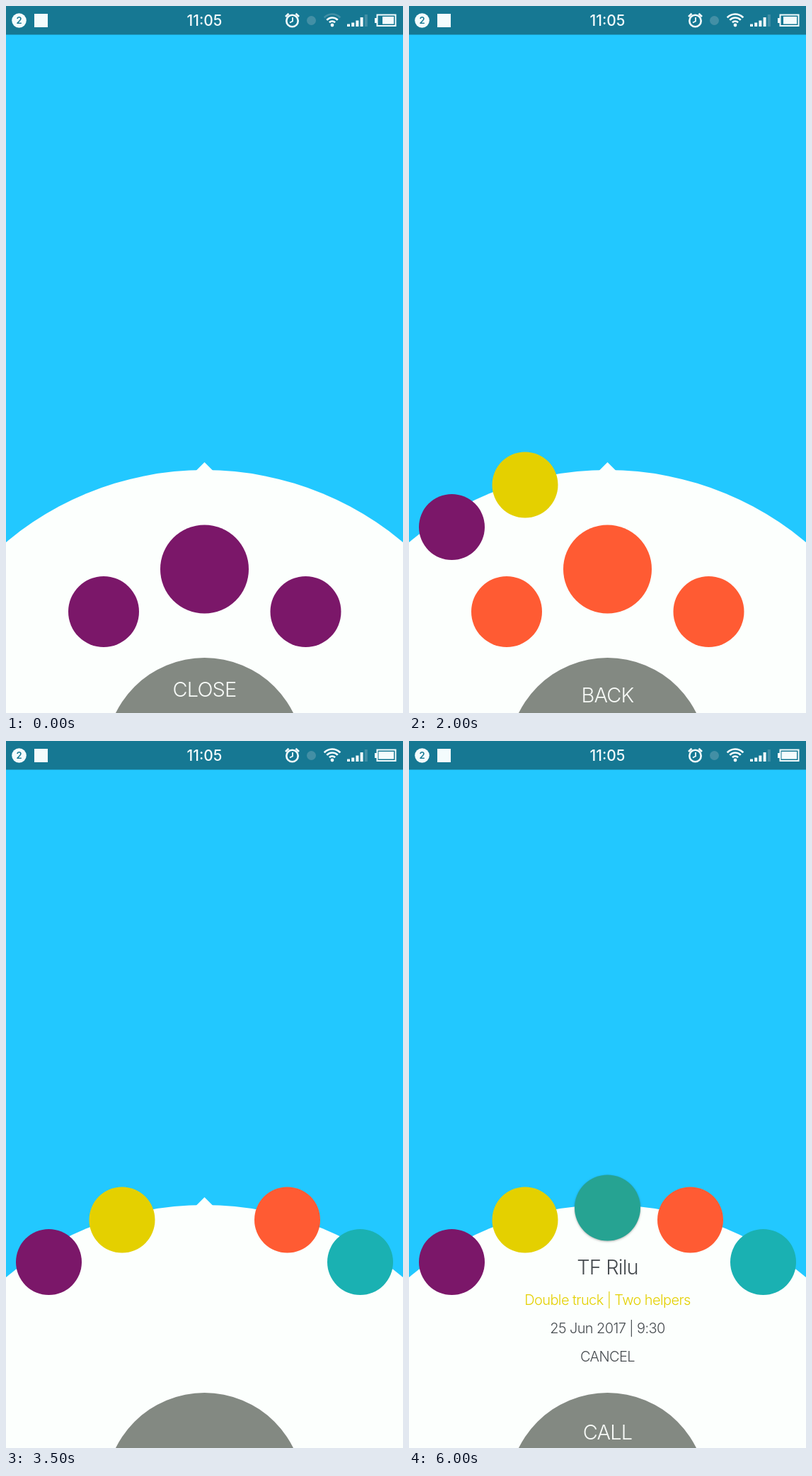
Write an HTML page with a canvas that moves like this. It is 561x998 px and loops after 6.1 s.

```html
<!DOCTYPE html>
<html lang="en">
<head>
<meta charset="utf-8">
<style>
  html, body { margin: 0; width: 100%; height: 100%; overflow: hidden; background: #22c8ff; }
  canvas { display: block; width: 561px; height: 998px; }
</style>
</head>
<body>
<canvas id="stage"></canvas>
<script>
const W = 561, H = 998, LOOP = 6100, STEP = 100, MID = 280.5;
const TAU = Math.PI * 2;
const SKY = '#22c8ff', PAPER = '#fcfffd', GRAY = '#838982', INK = '#474c50', YELLOW = '#e4d000';
const FLY = 470, ARC = 1.01;

const slots = [{ x: 138, y: 855, r: 50 }, { x: MID, y: 795, r: 62.5 }, { x: 423.5, y: 855, r: 50 }];
const picks = [
  { color: '#7b1769', slot: 0, at: 830, x: 60.5, y: 735.5 },
  { color: YELLOW, slot: 1, at: 1530, x: 164, y: 676 },
  { color: '#ff5b33', slot: 2, at: 2200, x: 397.5, y: 676 },
  { color: '#1ab1b2', slot: 0, at: 2855, x: 500.5, y: 735.5 }
];
const charge = [[0, 532], [1700, 529], [2600, 526.5], [4500, 532], [5300, 529], [5700, 526.5]];

const canvas = document.getElementById('stage');
const ctx = canvas.getContext('2d');
const dpr = window.devicePixelRatio || 1;
canvas.width = W * dpr;
canvas.height = H * dpr;

const span = (t, start, length) => Math.min(1, Math.max(0, (t - start) / length));
const mix = (a, b, k) => a + (b - a) * k;
const smooth = k => (1 - Math.cos(Math.PI * k)) / 2;
const easeOut = k => 1 - (1 - k) ** 3;

function disc(x, y, r, color) {
  ctx.fillStyle = color;
  ctx.beginPath();
  ctx.arc(x, y, Math.max(0, r), 0, TAU);
  ctx.fill();
}

function ring(x, y, r, width, color, from = 0, to = TAU) {
  ctx.strokeStyle = color;
  ctx.lineWidth = width;
  ctx.beginPath();
  ctx.arc(x, y, r, from, to);
  ctx.stroke();
}

function box(x, y, w, h, color) {
  ctx.fillStyle = color;
  ctx.fillRect(x, y, w, h);
}

function line(color, width, ...points) {
  ctx.strokeStyle = color;
  ctx.lineWidth = width;
  ctx.beginPath();
  points.forEach(([x, y]) => ctx.lineTo(x, y));
  ctx.stroke();
}

function text(str, x, y, size, color, weight = 300, spacing = -0.03) {
  ctx.font = `${weight} ${size}px Inter, "Liberation Sans", sans-serif`;
  ctx.letterSpacing = `${spacing * size}px`;
  ctx.textAlign = 'center';
  ctx.fillStyle = color;
  ctx.fillText(str, x, y);
}

function faded(alpha, draw) {
  if (alpha <= 0) return;
  ctx.save();
  ctx.globalAlpha = alpha;
  draw();
  ctx.restore();
}

// Point on a circular arc that bulges to the left of its direction of travel.
function arcPoint(a, b, k) {
  const dx = b.x - a.x, dy = b.y - a.y, angle = (2 * k - 1) * ARC;
  const along = 0.5 + Math.sin(angle) / (2 * Math.sin(ARC));
  const side = (Math.cos(angle) - Math.cos(ARC)) / (2 * Math.sin(ARC));
  return { x: a.x + dx * along + dy * side, y: a.y + dy * along - dx * side };
}

function statusBar(t) {
  const white = '#f4fcfd', dim = '#438fa5';
  box(0, 0, W, 40.5, '#167893');

  disc(18.5, 20.5, 10.3, white);
  text('2', 18.5, 25.2, 13, '#167893', 600, 0);
  box(40, 11, 19, 19, white);
  text('11:05', MID, 28, 21, white, 500, 0);

  ring(404.5, 21, 8.2, 2.6, white);
  line(white, 1.8, [405, 16], [405, 21.5], [401, 23.5]);
  line(white, 2.6, [395, 15], [399.5, 10.8]);
  line(white, 2.6, [414, 15], [409.5, 10.8]);

  disc(431.5, 20.5, 6.5, dim);

  [5.5, 10.5, 15.5].forEach((r, i) =>
    ring(461, 27, r, 2.7, i === 2 && t < 600 ? dim : white, -Math.PI * 0.76, -Math.PI * 0.24));
  disc(461, 27, 2.4, white);

  [3.5, 5.5, 8.5, 13, 17].forEach((h, i) =>
    box(482 + i * 6.2, 29 - h, 4, h, i === 4 ? dim : white));

  ctx.strokeStyle = white;
  ctx.lineWidth = 2;
  ctx.strokeRect(524.5, 12.5, 26, 15.5);
  box(521, 17, 3, 7, white);
  const left = charge.filter(([at]) => t >= at).pop()[1];
  box(left, 15, 548 - left, 10.5, white);
}

function panel() {
  disc(MID, 1091.7, 436.7, PAPER);
  ctx.beginPath();
  ctx.moveTo(MID, 644);
  ctx.lineTo(293, 656.5);
  ctx.lineTo(268, 656.5);
  ctx.fill();
}

function choices(t) {
  picks.forEach((pick, i) => {
    if (t >= pick.at) return;
    const k = i ? easeOut(span(t, picks[i - 1].at + 120, 330)) : 1;
    if (k > 0) {
      slots.forEach(s => disc(mix(MID, s.x, k), mix(1040, s.y, k), s.r * k, pick.color));
    }
  });
}

function picked(t) {
  for (const pick of picks) {
    if (t < pick.at) continue;
    const from = slots[pick.slot], k = smooth(span(t, pick.at, FLY));
    const p = arcPoint(from, pick, k);
    disc(p.x, p.y, mix(from.r, 46.5, k), pick.color);
  }
}

function touch(t) {
  for (const { slot, at } of picks) {
    if (t < at - 130 || t > at + 60) continue;
    const x = slots[slot].x + 3, y = slots[slot].y - 6;
    const glow = ctx.createRadialGradient(x, y, 14, x, y, 21);
    glow.addColorStop(0, 'rgba(200,225,225,.4)');
    glow.addColorStop(1, 'rgba(200,225,225,0)');
    disc(x, y, 21, glow);
    disc(x, y, 15.8, 'rgba(255,255,255,.42)');
  }
}

function button(t) {
  const k = smooth(span(t, 3500, 400)) - smooth(span(t, 4380, 500));
  disc(MID, mix(1060, 998, k), mix(140, 390, k), GRAY);

  const label = (str, y, alpha) => faded(alpha, () => text(str, MID, y, 29, '#f7faf7'));
  const swap = smooth(span(t, 830, 250));
  label('CLOSE', 975 - 20 * swap, 1 - swap * 2);
  label('BACK', 983 + 20 * (1 - swap), swap - span(t, 3350, 150));
  const call = easeOut(span(t, 5100, 400));
  label('CALL', 986 + 25 * (1 - call), call);

  if (t >= 3900 && t < 4400) {
    const turn = (t - 4100) / 1333 * TAU;
    const start = -0.73 + turn;
    ring(281, 803.5, 28, 6, SKY, start, start + 2.65 + 0.8 * Math.sin(turn));
  }
}

function details(t) {
  const pop = easeOut(span(t, 4850, 350));
  if (pop > 0) {
    ctx.save();
    ctx.shadowColor = 'rgba(0,0,0,.3)';
    ctx.shadowBlur = 3 * dpr;
    ctx.shadowOffsetY = dpr;
    disc(MID, 659, 46.5 * pop, '#26a392');
    ctx.restore();
  }
  const rows = [
    ['TF Rilu', 753, 29, INK],
    ['Double truck | Two helpers', 796, 20, YELLOW],
    ['25 Jun 2017 | 9:30', 836, 20, INK],
    ['CANCEL', 876, 20, INK]
  ];
  rows.forEach(([str, y, size, color], i) => {
    const k = easeOut(span(t, 5000 + i * 60, 350));
    faded(k, () => text(str, MID, y + 20 * (1 - k), size, color));
  });
}

function draw(t) {
  ctx.setTransform(dpr, 0, 0, dpr, 0, 0);
  box(0, 0, W, H, SKY);
  panel();
  choices(t);
  picked(t);
  touch(t);
  button(t);
  details(t);
  statusBar(t);
}

const begin = performance.now();
function tick() {
  const now = performance.now() - begin + 20;
  draw(Math.floor(now / STEP) * STEP % LOOP);
  requestAnimationFrame(tick);
}
tick();
</script>
</body>
</html>
```
